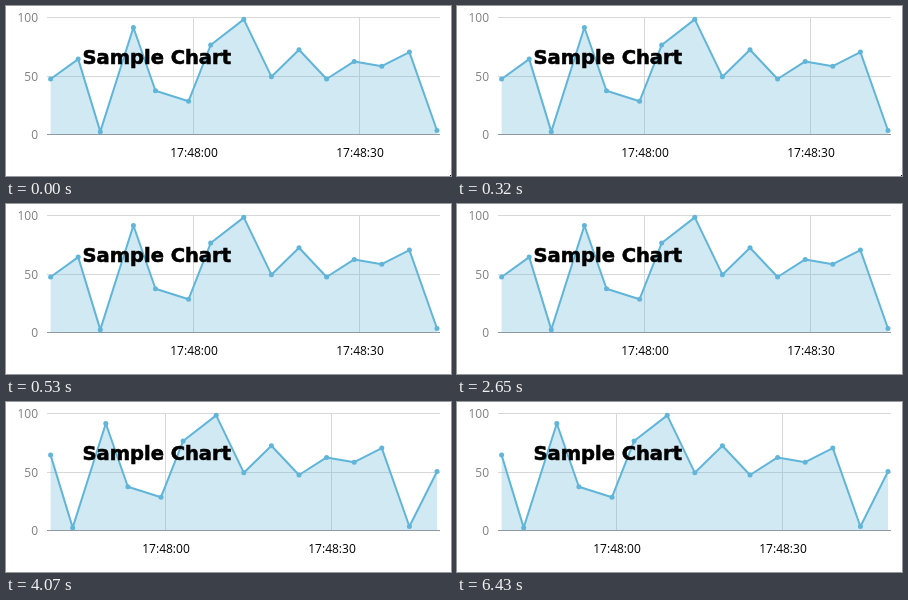
An HTML page that plays this animation: 445 px wide and 170 px high, repeating every 8000 ms.

```html
<!DOCTYPE html>
<html lang="en">
<head>
<meta charset="utf-8">
<title>Sample Chart</title>
<style>
  html, body { margin: 0; width: 100%; height: 100%; overflow: hidden; background: #fff; }
  svg { display: block; width: 445px; height: 170px; }
  text { font: 12px "Open Sans", "Noto Sans", sans-serif; }
  .grid { stroke: #d8d8d8; fill: none; shape-rendering: crispEdges; }
  .axis { stroke: #8f98a3; shape-rendering: crispEdges; }
  .value { fill: #808080; text-anchor: end; }
  .time { text-anchor: middle; }
  .area { fill: #5bb0d2; fill-opacity: .28; }
  .line { fill: none; stroke: #60b5d9; stroke-width: 2; stroke-linejoin: round; }
  .dot { fill: #60b5d9; }
  .title { font: 900 19.5px "DejaVu Sans", sans-serif; stroke: #000; stroke-width: .6; }
</style>
</head>
<body>
<svg viewBox="0 0 445 170">
  <g id="chart"></g>
  <text class="title" x="76.5" y="58">Sample Chart</text>
  <rect id="corner" x="444" y="169" width="1" height="1"/>
</svg>
<script>
const LOOP = 8000, CORNER_END = 530, UPDATE = 4070;
const WINDOW = 70, STEP = 5, FIRST_TICK = 25.9;

// [seconds, value]
const samples = [
  [0, 47], [5, 64], [9, 2], [15, 91], [19, 37], [25, 28], [29, 76], [35, 98],
  [40, 49], [45, 72], [50, 47], [55, 62], [60, 58], [65, 70], [70, 3], [75, 50]
];

const chart = document.getElementById('chart');
const corner = document.getElementById('corner');
const toX = seconds => 44.6 + seconds * 5.52;
const toY = value => 128 - value * 1.17;

function drawChart(start) {
  const points = samples
    .filter(([t]) => t >= start && t <= start + WINDOW)
    .map(([t, value]) => [toX(t - start), toY(value)]);
  const path = 'M' + points.join('L');

  const rows = [100, 50, 0].map(value => {
    const y = Math.round(toY(value)) + .5;
    return `<path class="${value ? 'grid' : 'axis'}" d="M41 ${y}H434"/>
      <text class="value" x="32" y="${y + 4.5}">${value}</text>`;
  });
  const columns = ['17:48:00', '17:48:30'].map((label, i) => {
    const x = Math.floor(toX(FIRST_TICK + 30 * i - start)) + .5;
    return `<path class="grid" d="M${x} 11V128"/>
      <text class="time" x="${x + .5}" y="151">${label}</text>`;
  });
  const dots = points.map(([x, y]) => `<circle class="dot" cx="${x}" cy="${y}" r="2.5"/>`);

  chart.innerHTML = [
    ...columns, ...rows,
    `<path class="area" d="${path}V128H${points[0][0]}Z"/>`,
    `<path class="line" d="${path}"/>`,
    ...dots
  ].join('');
}

let shownStart;
function render(now) {
  const time = now % LOOP;
  const start = time < UPDATE ? 0 : STEP;
  if (start !== shownStart) drawChart(shownStart = start);
  corner.style.display = time < CORNER_END ? '' : 'none';
  requestAnimationFrame(render);
}
render(performance.now());
</script>
</body>
</html>
```
